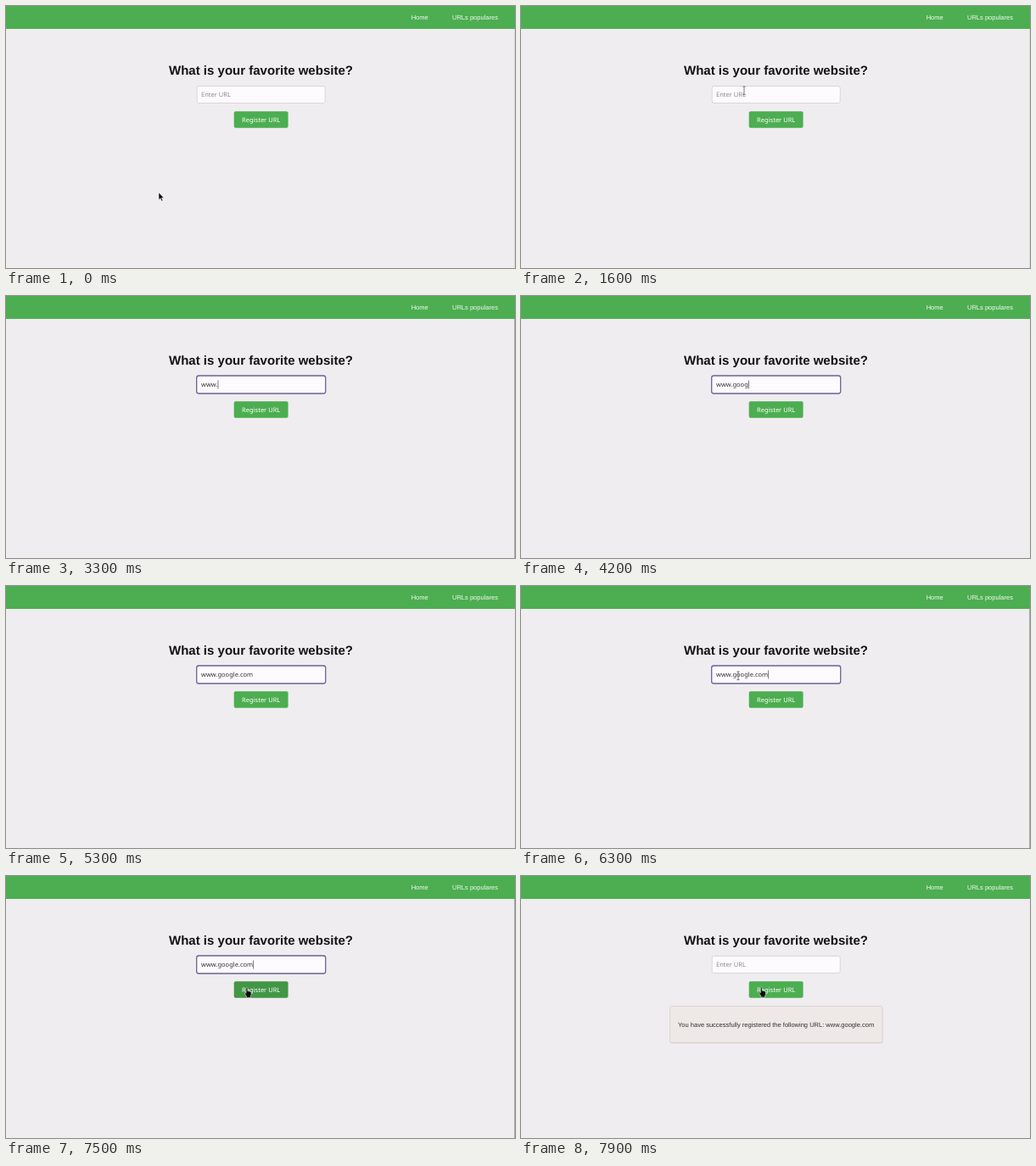
An HTML page for the animation above (8 s loop, 600 by 309 pixels).

```html
<!DOCTYPE html>
<html lang="en">
<head>
<meta charset="utf-8">
<title>Favorite website</title>
<style>
  html, body { margin: 0; width: 100%; height: 100%; overflow: hidden; background: #efedef; }
  svg { display: block; width: 600px; height: 309px; }
  text { font: 7.52px "Liberation Sans", Arial, sans-serif; text-rendering: geometricPrecision; white-space: pre; }
  .ui { font-family: "Noto Sans", sans-serif; }
</style>
</head>
<body>
<svg viewBox="0 0 600 309" xmlns="http://www.w3.org/2000/svg">
  <rect width="600" height="309" fill="#efedef"/>
  <rect width="600" height="27" fill="#4cae50"/>
  <rect id="edge" x="599" y="27" width="1" height="282"/>
  <g fill="#f4faf4">
    <text x="477.7" y="16">Home</text>
    <text x="526" y="16">URLs populares</text>
  </g>
  <text x="192" y="80.6" fill="#121214" style="font-size:15.03px;font-weight:bold">What is your favorite website?</text>

  <rect id="field" fill="#fdfbfd"/>
  <text id="value" class="ui" x="230" y="107.4"></text>
  <rect id="caret" y="99.5" width=".7" height="10" fill="#444"/>

  <rect id="button" x="268.7" y="124.2" width="63.9" height="19.6" rx="2"/>
  <text class="ui" x="278.1" y="136.8" fill="#fff">Register URL</text>

  <g id="tip">
    <rect x="264.7" y="110.8" width="72.8" height="14" rx="1.5" fill="#5f5d60"/>
    <text class="ui" x="267.3" y="120" fill="#fff" style="font-size:6.25px">Please fill out this field.</text>
  </g>

  <g id="result">
    <rect x="175.5" y="154.6" width="251" height="43" rx="2.5" fill="#dcd8d9"/>
    <rect x="175.5" y="153.5" width="250.5" height="43" rx="2" fill="#eee8e7" stroke="#d6d0d0" stroke-width=".8"/>
    <text x="185" y="177.8" fill="#333">You have successfully registered the following URL: www.google.com</text>
  </g>

  <g id="pointer">
    <path id="arrow" d="M0 0V8.6L2 6.8 3.3 10 4.8 9.4 3.5 6.3H6Z" fill="#0a0a0a" stroke="#fff" stroke-width=".5"/>
    <path id="beam" d="M-1.6 -5H1.6M0 -5V4.6M-1.6 4.6H1.6" fill="none" stroke="#6c6a6e" stroke-width=".9"/>
    <path id="hand" d="M1.1 .8Q2 -.5 2.9 .8V4.2L4.3 4.4 6.6 5.1Q7.2 5.5 7.1 6.5V8.5L6.2 10.4V12H1.6V10.6L-.4 7.5Q-.8 6.2 .2 6.1L1.1 6.9Z" fill="#0a0a0a" stroke="#fff" stroke-width=".5"/>
  </g>
</svg>
<script>
const LOOP = 8000, STEP = 100;
const URL_TEXT = "www.google.com";
// time at which each letter of the address is typed
const KEYS = [2800, 2900, 3100, 3300, 3700, 3900, 4100, 4200, 4400, 4500, 4700, 4900, 5000, 5200];

// [time, shape, x, y]
const POINTER = [
  [0, "arrow", 180, 220], [600, "arrow", 180.5, 220], [700, "arrow", 180, 220],
  [1000, "arrow", 183, 214], [1100, "arrow", 195, 193], [1200, "arrow", 213, 163],
  [1300, "arrow", 234, 130], [1400, "beam", 251, 106], [1500, "beam", 260, 98],
  [1600, "beam", 263, 100], [2200, "beam", 263.5, 101], [2800, "none", 0, 0],
  [6300, "beam", 256, 106], [6400, "arrow", 233, 122], [6500, "arrow", 207, 141],
  [6600, "arrow", 198, 147], [6700, "arrow", 245, 139], [6800, "hand", 281.3, 131],
  [7500, "hand", 282, 131.5], [7700, "hand", 281.3, 131]
];
const EDGE = [[0, "#d8dcd7"], [1800, "#aaa8aa"], [3500, "#ebe9eb"], [6300, "#aaa8aa"], [7900, "#ebe9eb"]];
const TIP = [[0, 0], [2800, .62], [2900, .3], [3000, 0]];

const el = id => document.getElementById(id);
const set = (id, attrs) => {
  for (const k in attrs) el(id).setAttribute(k, attrs[k]);
};
const show = (id, on) => set(id, { visibility: on ? "visible" : "hidden" });
const within = (t, a, b) => t >= a && t < b;
const latest = (list, t) => list.filter(k => k[0] <= t).pop();

function drawField(t) {
  const focus = within(t, 1800, 7900);
  const typed = focus ? KEYS.filter(k => k <= t).length : 0;
  const grow = focus ? .5 : 0;
  set("field", {
    x: 225.2 - grow, y: 94.5 - grow, width: 151 + 2 * grow, height: 20 + 2 * grow,
    rx: focus ? 2.5 : 2, stroke: focus ? "#6a6299" : "#d5d3d6", "stroke-width": focus ? 1.3 : .9
  });
  const value = el("value");
  value.textContent = typed ? URL_TEXT.slice(0, typed) : "Enter URL";
  value.setAttribute("fill", typed ? "#38363a" : "#8b898d");
  const end = typed ? 230 + value.getComputedTextLength() : 230;
  set("caret", { x: end + .2 });
  show("caret", within(t, 2800, 5300) || within(t, 6300, 7900));
}

function drawPointer(t) {
  const [, shape, x, y] = latest(POINTER, t);
  set("pointer", { transform: `translate(${x} ${y})` });
  for (const id of ["arrow", "beam", "hand"]) show(id, id === shape);
}

function draw(ms) {
  const t = Math.floor(ms % LOOP / STEP) * STEP;
  drawField(t);
  drawPointer(t);
  set("edge", { fill: latest(EDGE, t)[1] });
  set("tip", { opacity: latest(TIP, t)[1] });
  set("button", { fill: within(t, 6800, 7900) ? "#439646" : "#4cae50" });
  show("result", t >= 7900);
}

let start;
function tick(now) {
  start ??= now;
  draw(now - start);
  requestAnimationFrame(tick);
}
draw(0);
requestAnimationFrame(tick);
</script>
</body>
</html>
```
